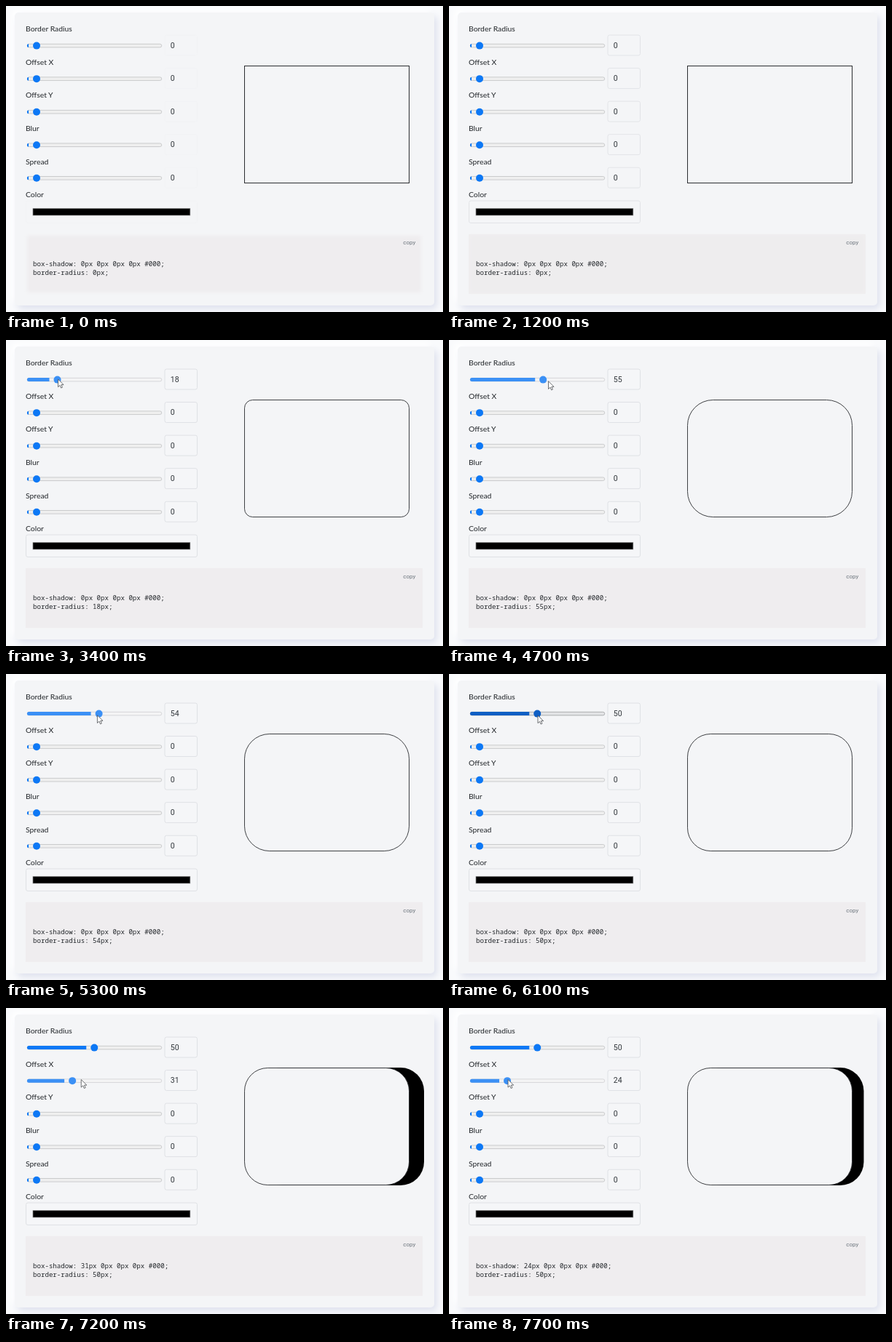
These frames come from a looping animation (600x421 px, 8 s). An HTML page:

```html
<!DOCTYPE html>
<html lang="en">
<head>
<meta charset="utf-8">
<title>Box shadow generator</title>
<style>
  html, body { margin: 0; width: 100%; height: 100%; overflow: hidden; background: #f9fafc; }
  .card {
    position: absolute; left: 12px; top: 9px; width: 576px; height: 403px;
    border-radius: 5px; background: #f4f5f7;
    box-shadow: 4px 5px 10px #dfe2ee, -5px -5px 10px #fff;
  }
  svg { position: absolute; left: 0; top: 0; width: 100%; height: 100%; }
  text { white-space: pre; }
  .label { font: 10.4px Lato, sans-serif; fill: #212529; }
  .num { font: 10.6px Roboto, sans-serif; fill: #32373c; }
  .code { font: 9.14px "Noto Sans Mono", monospace; fill: #24282c; }
  .copy { font: 8px Roboto, sans-serif; fill: #6c757d; }
  .field { fill: #f5f6f8; stroke: #dfe1e5; }
</style>
</head>
<body>
<div class="card"></div>
<svg id="stage" viewBox="0 0 600 421">
  <defs><filter id="soft"><feGaussianBlur stdDeviation="2"/></filter></defs>
  <rect id="panelSoft" x="29" y="316" width="541" height="78" fill="#efedef" filter="url(#soft)"/>
  <rect id="panel" x="27" y="314" width="545" height="82" fill="#efedef"/>
  <g id="fields"><rect class="field" x="27.5" y="268" width="235" height="30.5" rx="2.5"/></g>
  <g id="rows"></g>
  <text class="label" x="27" y="263">Color</text>
  <rect x="37" y="278.7" width="215.8" height="9.3" fill="#000" stroke="#767676" stroke-width=".7"/>
  <text class="copy" x="545.3" y="328.3">copy</text>
  <text class="code" id="line1" x="37" y="358.4"></text>
  <text class="code" id="line2" x="37" y="369.8"></text>
  <rect id="shadow" y="82" width="227" height="162"/>
  <rect id="box" x="327.5" y="82.5" width="226" height="161" fill="#f4f5f7" stroke="#2b2d30"/>
  <path id="cursor" d="M0 0V10.6L2.5 8.3L4.1 12L5.9 11.2L4.3 7.6H7.6Z"
        fill="#fff" stroke="#4a4c50" stroke-width=".8" stroke-linejoin="round"/>
</svg>
<script>
const SCALE = 0.645, UNIT = 1.585, STEP = 100, LOOP = 8000;
const $ = id => document.getElementById(id);

function add(parent, tag, attrs, text = "") {
  const el = document.createElementNS("http://www.w3.org/2000/svg", tag);
  set(el, attrs);
  el.textContent = text;
  parent.append(el);
  return el;
}
function set(el, attrs) {
  for (const k in attrs) el.setAttribute(k, attrs[k]);
}

// Slider colours: accent, track, track border
const LOOK = {
  idle: ["#0d78f5", "#efefef", "#b9babc"],
  hover: ["#0f5fc4", "#e3e4e6", "#949598"],
  active: ["#3b90f5", "#f4f4f5", "#cbcbcd"]
};

const sliders = ["Border Radius", "Offset X", "Offset Y", "Blur", "Spread"].map((name, i) => {
  const y = 54.6 + i * 45.55, g = $("rows");
  add(g, "text", { class: "label", x: 27, y: y - 19.3 }, name);
  add($("fields"), "rect", { class: "field", x: 218, y: y - 14.6, width: 44.5, height: 28, rx: 2.5 });
  const track = add(g, "rect", { x: 29.3, y: y - 2.3, width: 184.4, height: 4.6, rx: 2.3, "stroke-width": .7 });
  const fill = add(g, "path", {});
  const thumb = add(g, "circle", { cy: y, r: 5 });
  const num = add(g, "text", { class: "num", x: 225.8, y: y + 3 });
  return (value, state) => {
    const [accent, bg, edge] = LOOK[state], end = 31 + UNIT * value;
    set(track, { fill: bg, stroke: edge });
    set(fill, { fill: accent, d: `M${end} ${y - 2.5}H31.4a2.5 2.5 0 0 0 0 5H${end}Z` });
    set(thumb, { fill: accent, cx: 42 + UNIT * value });
    num.textContent = value;
  };
});

// Runs of values, one per step, held until the next run begins
const radiusRuns = [
  [0, [0]],
  [2500, [1, 3, 5, 7, 9, 11, 13, 15, 16, 18]],
  [4400, [20, 20, 40, 55, 59, 60, 60, 59, 57, 54, 52, 50]]
];
const offsetRuns = [
  [0, [0]],
  [6800, [2, 6, 13, 22, 31, 38, 41, 37, 28, 24]]
];
const enterRun = [[1600, [[319, 21], [270, 24], [206, 31], [142, 39], [90, 46], [58, 51], [46, 53], [44, 53], [43.5, 53.5]]]];
const moveRun = [[6100, [[122, 57], [115, 64], [95, 77], [70, 90], [52, 97], [43.5, 98.5]]]];

function at(runs, t) {
  let [start, vals] = runs[0];
  for (const run of runs) if (t >= run[0]) [start, vals] = run;
  const i = Math.floor((t - start) / STEP);
  return vals[Math.max(0, Math.min(i, vals.length - 1))];
}

// While dragging, the pointer runs one step ahead of the thumb
function dragX(runs, t) {
  const moving = at(runs, t) !== at(runs, t - STEP);
  return 43 + UNIT * at(runs, moving ? t + STEP : t);
}

function pointer(t) {
  if (t < 1600) return null;
  if (t < 2500) return at(enterRun, t);
  if (t < 6100) return [dragX(radiusRuns, t), t < 4600 ? 54 : 56.8];
  if (t < 6800) return at(moveRun, t);
  return [dragX(offsetRuns, t), 98.5];
}

function stateOf(t, hoverFrom, press, release, leave) {
  if (t >= press && t < release) return "active";
  return t >= hoverFrom && t < leave ? "hover" : "idle";
}

function draw(t) {
  const radius = at(radiusRuns, t), offset = at(offsetRuns, t);
  sliders[0](radius, stateOf(t, 2100, 2500, 6100, 6200));
  sliders[1](offset, stateOf(t, 6500, 6800, LOOP, LOOP));
  for (const s of sliders.slice(2)) s(0, "idle");

  const r = radius * SCALE;
  set($("box"), { rx: Math.max(0, r - .5), "stroke-width": radius ? .9 : 1 });
  set($("shadow"), { x: 327 + offset * SCALE, rx: r, visibility: offset ? "visible" : "hidden" });
  $("line1").textContent = `box-shadow: ${offset}px 0px 0px 0px #000;`;
  $("line2").textContent = `border-radius: ${radius}px;`;

  const sharp = Math.max(0, Math.min(1, (t - 700) / 600));
  const shown = t < 800 ? 0 : sharp;
  set($("fields"), { opacity: .12 + .88 * shown });
  set($("panel"), { opacity: shown });

  const p = pointer(t);
  set($("cursor"), p ? { visibility: "visible", transform: `translate(${p})` } : { visibility: "hidden" });
}

const begin = performance.now();
function tick() {
  const t = (performance.now() - begin) % LOOP;
  draw(Math.floor(t / STEP) * STEP);
  requestAnimationFrame(tick);
}
tick();
</script>
</body>
</html>
```
